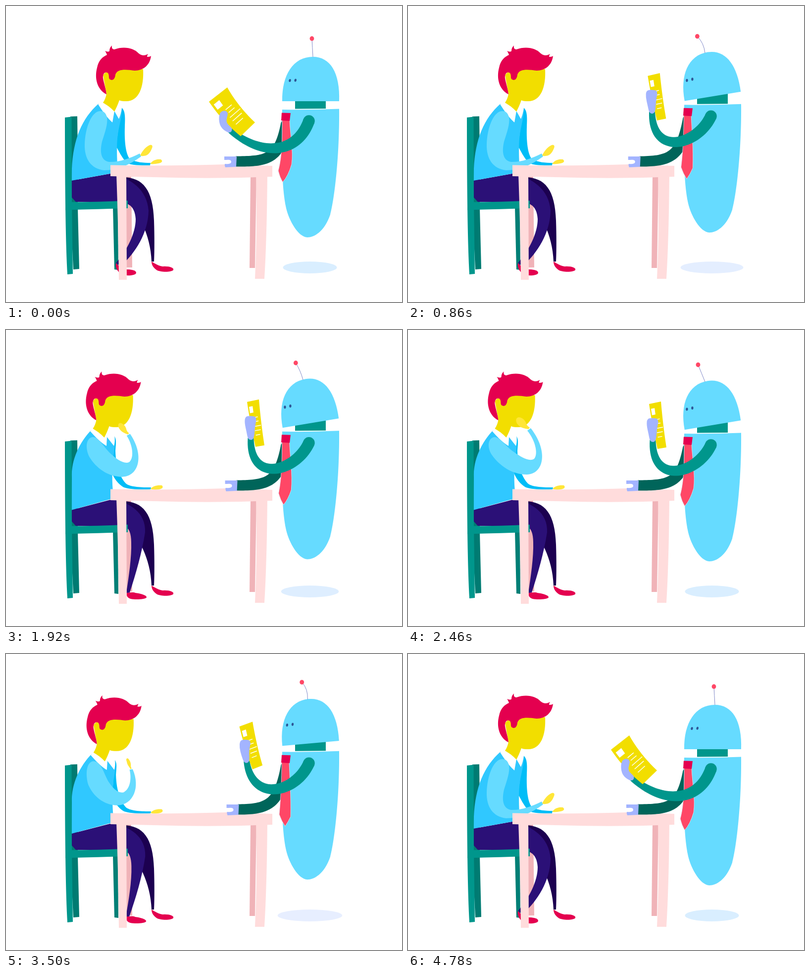
These frames come from a looping animation (800 px wide and 600 px high, 4800 ms). An HTML page with a canvas:

```html
<!DOCTYPE html>
<html lang="en">
<head>
<meta charset="utf-8">
<title>Interview with a robot</title>
<style>
html, body { margin: 0; width: 100%; height: 100%; overflow: hidden; background: #fff; }
canvas { display: block; width: 800px; height: 600px; }
</style>
</head>
<body>
<canvas id="stage" width="800" height="600"></canvas>
<script>
const ctx = document.getElementById('stage').getContext('2d');
const LOOP = 4800;
const C = {
  hair: '#e4004f', skin: '#f2de00', hand: '#ffe638', sweater: '#30c8ff', sleeve: '#66dbff',
  farSleeve: '#00bdf7', pants: '#2b1077', farLeg: '#1c0050', green: '#00968c', darkGreen: '#007b72',
  farArm: '#00655a', table: '#ffdcdc', farTable: '#f0b3b8', glove: '#a3b4ff', tie: '#ff4766'
};

const lerp = (a, b, p) => a + (b - a) * p;
const mixPt = (a, b, p) => a.map((v, i) => lerp(v, b[i], p));
const mixPts = (a, b, p) => a.map((v, i) => mixPt(v, b[i], p));

function ease(t, from, to) {
  const x = Math.min(1, Math.max(0, (t - from) / (to - from)));
  return x < 0.5 ? 4 * x ** 3 : 1 - 4 * (1 - x) ** 3;
}
const thereAndBack = (t, a, b, c, d) => ease(t, a, b) - ease(t, c, d);

// Blends two path strings that share the same commands.
function morph(a, b, p) {
  const to = b.match(/-?[\d.]+/g);
  let i = 0;
  return a.replace(/-?[\d.]+/g, n => lerp(+n, +to[i++], p).toFixed(2));
}

function fill(color, d) {
  ctx.fillStyle = color;
  ctx.fill(new Path2D(d));
}

function stroke(color, width, d) {
  ctx.strokeStyle = color;
  ctx.lineWidth = width;
  ctx.stroke(new Path2D(d));
}

function ellipse(color, x, y, rx, ry, turn = 0) {
  ctx.fillStyle = color;
  ctx.beginPath();
  ctx.ellipse(x, y, rx, ry, turn, 0, 7);
  ctx.fill();
}

// Tapered limb along a cubic curve with a round shoulder.
function limb(color, pts, startWidth, endWidth) {
  const [p0, p1, p2, p3] = pts;
  const left = [], right = [];
  for (let i = 0; i <= 40; i++) {
    const t = i / 40, u = 1 - t;
    const at = k => u * u * u * p0[k] + 3 * u * u * t * p1[k] + 3 * u * t * t * p2[k] + t * t * t * p3[k];
    const slope = k => u * u * (p1[k] - p0[k]) + 2 * u * t * (p2[k] - p1[k]) + t * t * (p3[k] - p2[k]);
    const len = Math.hypot(slope(0), slope(1));
    const r = lerp(startWidth, endWidth, t * t) / 2;
    const nx = -slope(1) / len * r, ny = slope(0) / len * r;
    left.push([at(0) + nx, at(1) + ny]);
    right.unshift([at(0) - nx, at(1) - ny]);
  }
  fill(color, 'M' + left.concat(right).join('L') + 'Z');
  ellipse(color, p0[0], p0[1], startWidth / 2, startWidth / 2);
}

// Closed smooth blob through the midpoints of its corners.
function blob(color, pts) {
  const mid = i => mixPt(pts[i % pts.length], pts[(i + 1) % pts.length], 0.5);
  let d = 'M' + mid(0);
  for (let i = 1; i <= pts.length; i++) d += 'Q' + pts[i % pts.length] + ' ' + mid(i);
  fill(color, d + 'Z');
}

function drawBackFurniture() {
  fill(C.darkGreen, 'M130 224L144 223.500L145 300L145 410L148 533L136 534L130 410Z');
  fill(C.farTable, 'M240 346L253 346L255 530L240 530Z');
  fill(C.farTable, 'M494 346L506 346L503 531L492 531Z');
  fill('#007f76', 'M216 408L226 408L227 535L219 534Z');
}

function drawChair() {
  fill(C.green, 'M119 226L132.500 224.500L133 396L135 543L124 544Q119 460 119 226Z');
  fill(C.green, 'M120 397.500Q190 397.500 246 394.500L246 410Q190 411.500 120 413.500Z');
}

function drawTable() {
  fill(C.table, 'M223 340L243 340L244 555L228 555Q227 450 223 340Z');
  fill(C.table, 'M505 340L528 340Q527 470 522 553L503 553Q508 450 505 340Z');
  fill(C.table, 'M211 322.500Q320 325 445 321L538 324L538 346Q420 351 300 347L211 345Z');
}

function drawLegs(lean, leg) {
  fill(C.farLeg, 'M235 347C278 347 297 374 299 435C300 465 300 495 299 518L294 518C293 490 286 465 277 445L255 400Z');
  fill(C.hair, 'M294 518C302 523 309 527 317 528C330 527 340 531 338 535C334 540 312 540 304 535C297 530 294 524 294 518Z');
  const hip = lerp(354, 365, lean), waist = lerp(339, 343, lean);
  fill(C.hair, morph(
    'M222 521C228 527 236 532 245 534C255 534 263 536 263 541C262 547 243 547 235 545C226 540 220 530 222 521Z',
    'M244 532C250 533 256 530 262 533C272 534 285 538 284 542C282 546 262 547 252 545C244 543 243 537 244 532Z', leg));
  fill(C.pants, `M132 ${hip}L215 ${waist}` + morph(
    'C250 350 285 370 288 415C287 460 262 500 232 527L222 521C245 495 262 460 262 432C261 412 252 403 244 401',
    'C250 350 283 370 281 410C275 450 262 495 250 532L243 533C248 500 254 460 253 430C253 412 248 403 244 401', leg) +
    'L225 397L141 397L132 387Z');
}

function drawHead(lean) {
  ctx.save();
  ctx.translate(-20.5 * lean, 4 * lean);
  fill(C.skin, 'M196 140L210 125L277 128C279 165 268 193 243 193C237 193 233 193 229 191C226 200 222 208 219 214C212 206 203 200 196 196C200 190 202 184 203 178Z');
  fill(C.hair, 'M203 179C185 170 178 148 184 125C187 110 195 103 204 99C203 96 202 94 200 91' +
    'C205 93 208 93 209 91C209 86 211 83 214 80C213 85 215 88 219 88C238 81 258 85 268 96' +
    'C274 101 281 101 287 97C285 101 285 102 285 103C288 103 291 103 293 101' +
    'C291 120 277 131 260 131C245 129 225 126 221 139C220 150 214 152 209 148' +
    'C207 145 209 140 206 136C201 132 195 137 196 146C198 158 202 168 203 179Z');
  ctx.restore();
}

function drawMan(lean, raise, leg) {
  drawLegs(lean, leg);
  fill(C.farSleeve, morph(
    'M233 206C241 211 241 225 240 245C239 275 242 300 250 310C262 317 278 318 292 318L291 323C270 323 255 323 246 319C236 312 226 290 222 284C226 260 229 235 228 229Z',
    'M218 214C224 221 222 230 221 245C222 280 232 300 242 311C252 319 275 319 293 319L292 323C270 324 250 323 238 319C226 312 218 300 214 290C216 265 217 245 213 232Z', lean));
  fill(C.hand, morph(
    'M291 320C297 312 305 310 313 311C318 315 314 318 308 319C302 320 297 321 291 320Z',
    'M292 322C297 316 306 314 315 315C319 319 315 322 309 323C302 324 297 324 292 322Z', lean));
  fill(C.sweater, morph(
    'M187 198C153 228 136 270 133 330L132 354L226 337C224 310 223 280 226 260C229 240 235 222 234 207L219 214Z',
    'M172 203C150 226 131 262 133 300L132 365L218 341C214 320 214 290 216 260C219 245 221 230 219 216L204 217Z', lean));
  fill('#fff', morph(
    'M186 199L196 194L219 213L215 236Q202 225 186 199Z',
    'M170 205L182 195L204 217L203 235Q189 227 170 205Z', lean));
  fill('#fff', morph(
    'M219 213L229 195L234 207Q232 220 228 229Z',
    'M204 217L211 204L219 213Q221 226 218 235Z', lean));
  drawHead(lean);

  const sleeveDown = morph(
    'M190 213C172 214 160 248 159 280C158 310 172 330 198 333C225 333 250 322 273 305L270 299C250 309 228 317 208 316C190 313 190 292 194 275C200 255 206 240 204 226C202 217 198 213 190 213Z',
    'M180 218C166 218 160 250 159 285C160 312 172 331 198 332C225 331 250 315 270 296L265 290C250 304 228 316 207 315C189 312 188 292 190 275C194 255 197 242 196 233C194 224 187 218 180 218Z', lean);
  fill(C.sleeve, morph(sleeveDown,
    'M174 217C160 220 160 240 170 254C185 275 210 293 240 293C275 292 284 245 248 199L241 204C256 222 264 250 255 261C245 268 228 257 215 248C203 240 196 231 189 225C184 220 179 217 174 217Z', raise));
  const handDown = morph(
    'M271 303C275 295 280 287 290 282C295 280 297 284 295 288C292 296 288 301 283 303C278 304 275 305 271 303Z',
    'M268 292C271 283 275 272 284 266C288 265 289 270 288 274C286 283 281 289 276 293C273 294 270 294 268 292Z', lean);
  fill(C.hand, morph(handDown,
    'M243 201C238 200 228 199 222 192C217 186 217 178 223 177C229 176 237 182 239 190C241 195 244 196 246 198Z', raise));
}

function drawCard(read) {
  const [a, b, c, d] = mixPts(
    [[410, 194], [447, 165], [503, 236], [474, 264]],
    [[487, 150], [511, 145], [522, 238], [504, 241]], read);
  const bow = lerp(3.5, 1, read);
  const at = (u, v) => {
    const [x, y] = mixPt(mixPt(a, b, u), mixPt(d, c, u), v);
    const k = 4 * v * (1 - v) * bow;
    return [x - k * 0.75, y + k * 0.65];
  };
  const edge = u => [...Array(11)].map((_, i) => at(u, i / 10));
  fill(C.skin, 'M' + edge(0).concat(edge(1).reverse()).join('L') + 'Z');
  fill('#fff', 'M' + [at(0.1, 0.11), at(0.41, 0.11), at(0.41, 0.25), at(0.1, 0.25)].join('L') + 'Z');
  const rows = [[0.38, 0.74, 0.36], [0.41, 0.76, 0.45], [0.3, 0.94, 0.55], [0.28, 0.86, 0.645], [0.28, 0.74, 0.745]];
  for (const [from, to, v] of rows) stroke('#fff', 1.5, `M${at(from, v)}L${at(to, v)}`);
}

function drawRobotHead(lift, tilt, happy) {
  ctx.save();
  ctx.translate(615, 193);
  ctx.rotate(-tilt * 9.5 * Math.PI / 180);
  ctx.translate(-615, -193);
  fill(C.sleeve, 'M558 193C557 140 580 103 620 103C655 103 675 135 673 193Z');
  for (const [x, y] of [[573.5, 151], [584.7, 150.5]]) {
    const ex = x - 4 * tilt, ey = y + 1.5 * tilt;
    if (happy) stroke('#2d5596', 1.7, `M${ex - 2.5} ${ey + 1.5}Q${ex - 0.5} ${ey - 4} ${ex + 2.3} ${ey + 0.5}`);
    else ellipse('#2d5596', ex, ey, 2.2, 3.1, 0.2);
  }
  ctx.restore();

  const base = mixPt([620, 103], [600, 105], tilt);
  const tip = mixPt([618 - 4.5 * lift, 66], [586 - 2 * lift, 70.5 + lift], tilt);
  const mid = mixPt(base, tip, 0.5);
  stroke('#8089c8', 1, `M${base}Q${mid[0] + 7 * lift} ${mid[1] - 4 * lift} ${tip}`);
  ellipse(C.tie, tip[0], tip[1], 4.4, 4.7);
}

function drawRobot(lift, read, tilt, happy) {
  const rise = 12 * lift;
  ellipse(`rgb(${lerp(217, 231, lift)}, 238, 255)`, 614, 530, 54.5 + 11 * lift, 12);

  const slide = 4.6 * lift;
  limb(C.farArm, [[566, 240 - rise], [552, 311 - rise / 2], [529, 315], [464 + slide, 315]], 22, 21);
  ctx.save();
  ctx.translate(slide, 0);
  fill(C.glove, 'M441 305L466 305L465 326L443 327Q441 323 442 320C448 321 455 320 455 316C455 310 447 312 441 312Z');
  ctx.restore();

  ctx.save();
  ctx.translate(0, -rise);
  fill(C.green, 'M584 178L646 178L646 208L584 208.500Z');
  fill(C.sleeve, 'M558 210Q615 211 673 208.500C674 300 664 390 655 423C643 458 622 469 609 469C590 468 572 435 566 410C556 365 557 290 558 210Z');
  drawRobotHead(lift, tilt, happy);

  const tie = morph(
    'M558 231L573 231C574 260 581 295 577 321Q570 345 559 357Q553 347 550 334C558 305 558 265 558 231Z',
    'M557 231L572 231C573 260 576 300 575 342Q570 352 564 361Q557 351 552 337C555 305 557 265 557 231Z', lift);
  fill(C.tie, tie);
  stroke('#d8f3ff', 0.7, tie);
  fill(C.hair, 'M557 216.500L575 217L573 233L556 232Z');

  limb(C.green, mixPts(
    [[612, 233], [588, 300], [518, 306], [453, 252]],
    [[612, 233], [585, 292], [492, 317], [494.5, 223]], read), 23.5, 12);
  drawCard(read);
  blob(C.glove, mixPts(
    [[452, 259], [435, 248], [430, 234], [431, 217], [440, 211], [450, 216], [443, 236], [459, 249]],
    [[489, 227], [486, 211], [482, 193], [483, 180], [493, 178], [507, 180], [503, 200], [501, 227]], read));
  ctx.restore();
}

function draw(now) {
  const t = now % LOOP;
  const lift = (1 - Math.cos(t / LOOP * 4 * Math.PI)) / 2;
  const read = thereAndBack(t, 130, 1050, 3150, 4100);
  const tilt = thereAndBack(t, 130, 850, 3150, 3870);
  const lean = thereAndBack(t, 960, 1800, 3240, 4300);
  const raise = thereAndBack(t, 1300, 2200, 3100, 4000);
  const leg = thereAndBack(t, 1000, 1900, 3260, 4360);
  const happy = t > 3760 && t < 4160;

  ctx.fillStyle = '#fff';
  ctx.fillRect(0, 0, 800, 600);
  drawBackFurniture();
  drawMan(lean, raise, leg);
  drawChair();
  drawTable();
  drawRobot(lift, read, tilt, happy);
}

const start = performance.now();
function frame() {
  draw(performance.now() - start);
  requestAnimationFrame(frame);
}
frame();
</script>
</body>
</html>
```
